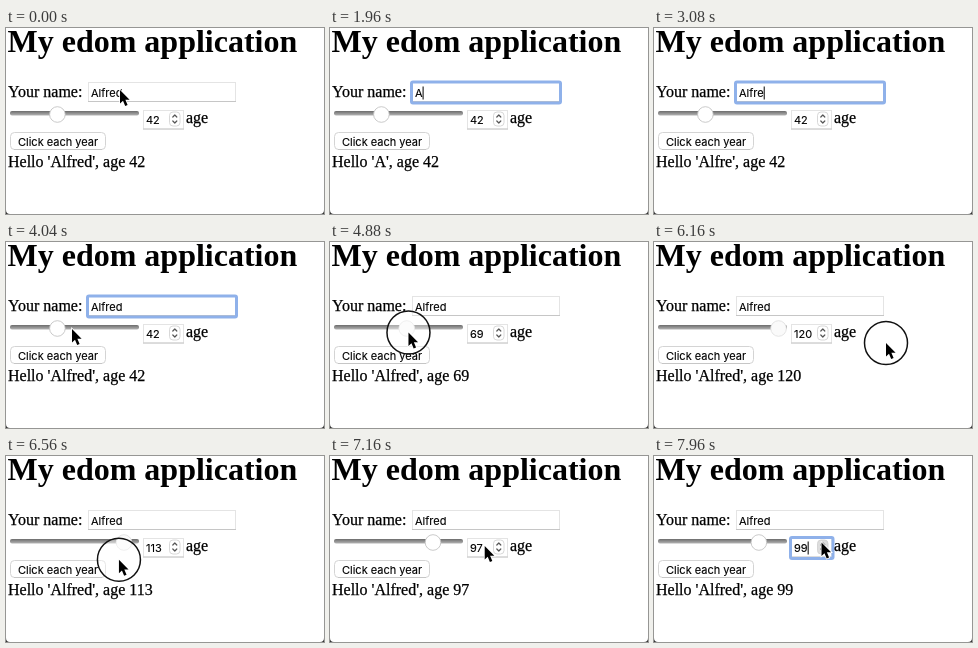
An HTML page that plays this animation: 318 by 186 pixels, repeating every 8000 ms.

```html
<!DOCTYPE html>
<html lang="en">
<head>
<meta charset="utf-8">
<title>My edom application</title>
<style>
  html, body { margin: 0; width: 100%; height: 100%; overflow: hidden; background: #fff; }
  svg { display: block; width: 100vw; height: 100vh; }
  text { font: 16px "Liberation Serif", "Times New Roman", serif; white-space: pre; stroke: #000; stroke-width: .25; }
  text.title { font-size: 32px; font-weight: bold; stroke: none; }
  text.ui { font: 11px Inter, "Open Sans", sans-serif; stroke-width: .12; }
  .field { fill: #fff; stroke: #e4e4e4; }
  .base { stroke: #c6c6c6; }
  .ring { fill: none; stroke: #8fb1ea; stroke-width: 3; }
  .chevron { fill: none; stroke: #555; stroke-width: 1.2; stroke-linecap: round; stroke-linejoin: round; }
</style>
</head>
<body>
<svg viewBox="0 0 318 186">
  <defs>
    <linearGradient id="groove" x2="0" y2="1">
      <stop offset="0" stop-color="#6c6c6c"/>
      <stop offset="1" stop-color="#b4b4b4"/>
    </linearGradient>
  </defs>
  <rect width="318" height="186" fill="#fff"/>
  <path d="M0 182V186H4A4 4 0 0 1 0 182M318 182V186H314A4 4 0 0 0 318 182" fill="#333"/>

  <text class="title" x="1.5" y="24">My edom application</text>
  <text x="2" y="69">Your name:</text>

  <rect class="field" x="82.5" y="54.5" width="147" height="19"/>
  <path class="base" d="M82 73.5H230"/>
  <rect id="nameRing" class="ring" x="81.5" y="54" width="149" height="21" rx="1.5"/>
  <rect id="selection" x="85" y="58" height="14" fill="#b3d7ff"/>
  <text id="name" class="ui" x="85" y="69"></text>
  <rect id="nameCaret" y="58.5" width="1" height="13"/>

  <rect x="4" y="83" width="129" height="4.5" rx="2" fill="url(#groove)"/>
  <circle id="thumb" cy="86.5" r="7.8" stroke-width=".8"/>

  <rect class="field" x="137.5" y="82.5" width="40" height="18.5"/>
  <path class="base" d="M137 101H178"/>
  <rect id="ageRing" class="ring" x="136.5" y="81.5" width="42.5" height="21" rx="1.5"/>
  <text id="age" class="ui" x="140" y="96"></text>
  <rect id="ageCaret" y="85.5" width="1" height="13"/>
  <rect id="stepper" x="163.5" y="84" width="10.5" height="14" rx="3.5" stroke="#cfcfcf" stroke-width=".8"/>
  <path class="chevron" d="M166.8 89L168.8 87L170.8 89M166.8 93L168.8 95L170.8 93"/>
  <text x="180" y="95">age</text>

  <rect x="4.5" y="104.5" width="95" height="17" rx="4" fill="#fff" stroke="#d4d4d4"/>
  <path class="base" d="M8 121.5H96"/>
  <text class="ui" x="12" y="118">Click each year</text>
  <text id="greeting" x="2" y="139"></text>

  <circle id="press" r="21.5" fill="#fff" fill-opacity=".4" stroke="#111" stroke-width="1.5"/>
  <path id="arrow" d="M0 0V13.5L3 10.8L5.2 16L7.6 15L5.4 9.8H9.6Z" stroke="#fff" stroke-width="1.6" paint-order="stroke"/>
  <path id="beam" d="M-3 -7.5Q0 -7.5 0 -5V5Q0 7.5 -3 7.5M3 -7.5Q0 -7.5 0 -5M0 5Q0 7.5 3 7.5" fill="none" stroke="#111" stroke-width="1.1"/>
</svg>
<script>
const LOOP = 8000, STEP = 40, CLICK = 80;
const DRAG = [4400, 6800];
const AGE_MAX = 120, THUMB_MIN = 12, THUMB_SCALE = 0.938;
const CLICKS = [40, 200, 7400, 7880];
const $ = id => document.getElementById(id);
const show = (id, on) => $(id).setAttribute('visibility', on ? 'visible' : 'hidden');
const clamp = (v, lo, hi) => Math.max(lo, Math.min(hi, v));
const within = (t, a, b) => t >= a && t < b;
const ease = k => k * k * (3 - 2 * k);

// eased pointer moves: start, end, then where to
const moves = [
  [3680, 4040, 66, 87],
  [4080, 4320, 51.4, 85],
  [4480, 5120, 91, 93],
  [5240, 5640, -5, 107.5],
  [5880, 6160, 232, 101],
  [6170, 6640, 103, 104],
  [6760, 7320, 167.5, 86.5]
];

// keystrokes, "<" is backspace
const keys = 'Alfrd<ed';
const keyTimes = [1960, 2240, 2440, 2520, 2640, 2960, 3080, 3240];

function pointer(t) {
  let x = 114, y = 62;
  for (const [t0, t1, toX, toY] of moves) {
    const k = ease(clamp((t - t0) / (t1 - t0), 0, 1));
    x += (toX - x) * k;
    y += (toY - y) * k;
  }
  return [x, y];
}

function nameAt(t) {
  const count = keyTimes.filter(k => k <= t).length;
  if (!count) return 'Alfred';
  return [...keys.slice(0, count)].reduce((s, c) => c === '<' ? s.slice(0, -1) : s + c, '');
}

function ageAt(t) {
  if (t < DRAG[0]) return 42;
  // the slider trails the pointer slightly
  const [x] = pointer(Math.min(t - STEP / 2, 6700));
  const dragged = clamp(Math.round((x - THUMB_MIN) / THUMB_SCALE), 0, AGE_MAX);
  return dragged + CLICKS.filter(c => c > DRAG[1] && c <= t).length;
}

function draw(t) {
  const [x, y] = pointer(t);
  const name = nameAt(t), age = ageAt(t);
  const dragging = within(t, ...DRAG);
  const typing = within(t, keyTimes[0], moves[0][0]);
  const ageFocus = t >= CLICKS[2];

  $('name').textContent = name;
  $('age').textContent = age;
  $('greeting').textContent = `Hello '${name}', age ${age}`;
  const nameWidth = $('name').getComputedTextLength();
  $('selection').setAttribute('width', nameWidth);
  $('nameCaret').setAttribute('x', 85 + nameWidth);
  $('ageCaret').setAttribute('x', 140 + $('age').getComputedTextLength());
  show('nameRing', within(t, CLICKS[0], DRAG[0]));
  show('selection', within(t, CLICKS[1], keyTimes[0]));
  show('nameCaret', within(t, CLICKS[0], CLICKS[1]) || typing);
  show('ageRing', ageFocus);
  show('ageCaret', ageFocus);
  $('stepper').setAttribute('fill', ageFocus ? '#ddd' : '#fff');

  $('thumb').setAttribute('cx', THUMB_MIN + age * THUMB_SCALE);
  $('thumb').setAttribute('fill', dragging ? '#fafafa' : '#fff');
  $('thumb').setAttribute('stroke', dragging ? '#ddd' : '#bdbdbd');

  const overText = within(t, CLICKS[0], DRAG[0]) && y < 76;
  show('beam', overText && !typing);
  show('arrow', !overText && !typing);

  const presses = [DRAG, ...CLICKS.map(c => [c, c + CLICK])];
  const press = presses.find(p => within(t, ...p));
  show('press', press);
  $('press').setAttribute('opacity', press && press[1] - t <= STEP ? 0.5 : 1);
  for (const id of ['beam', 'arrow', 'press'])
    $(id).setAttribute('transform', `translate(${x} ${y})`);
}

const start = performance.now();
function tick() {
  const t = (performance.now() - start) % LOOP;
  draw(Math.floor(t / STEP) * STEP);
  requestAnimationFrame(tick);
}
tick();
</script>
</body>
</html>
```
